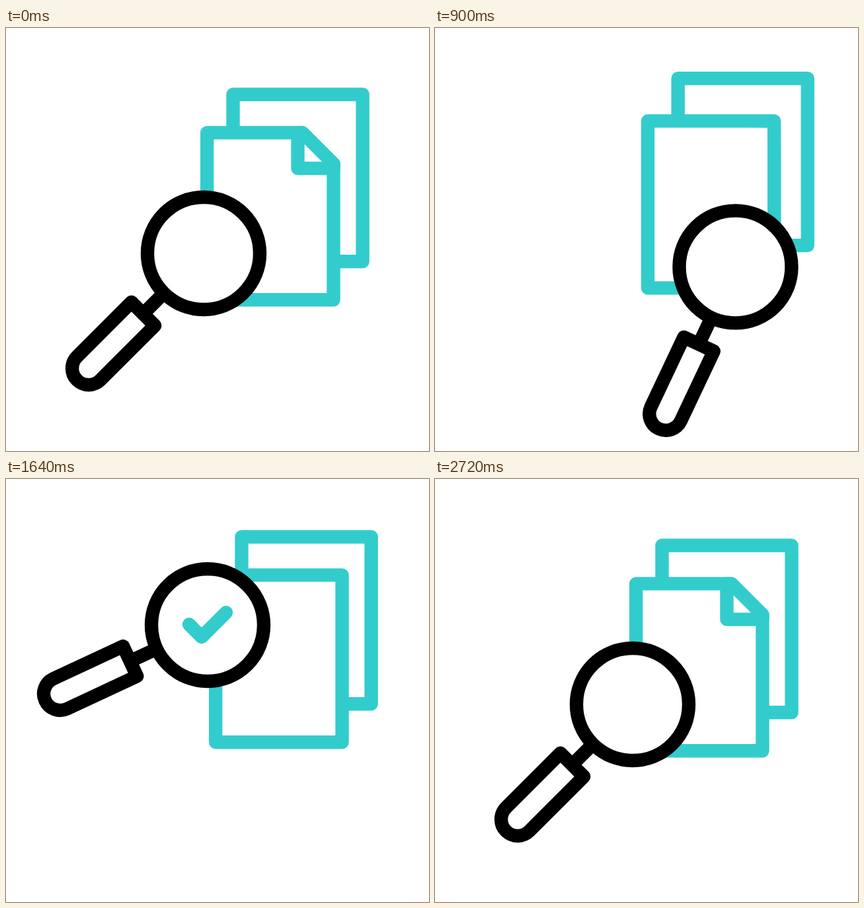
Recreate the animation shown at these times as an HTML page. Size 640 px wide and 640 px high, loop 3 s.

```html
<!DOCTYPE html>
<html lang="en">
<head>
<meta charset="utf-8">
<title>Document search</title>
<style>
html, body { margin: 0; width: 100%; height: 100%; overflow: hidden; background: #fff; }
svg { display: block; width: 100vw; height: 100vh; }
.line { stroke-width: 20.4; stroke-linecap: round; stroke-linejoin: round; }
.teal { stroke: #33cccc; }
.ink { stroke: #000; }
.paper { fill: #fff; }
.bare { fill: none; }
</style>
</head>
<body>
<svg viewBox="0 0 640 640">
  <defs><clipPath id="lens"><circle r="82"/></clipPath></defs>
  <path id="back" class="line teal paper" d="M343.5 100.5H539.6V353.2H343.5Z"/>
  <g id="front">
    <path id="sheet" class="line teal paper"/>
    <path id="flap" class="line teal paper"/>
  </g>
  <g id="glass">
    <g id="handle">
      <path class="line ink" d="M0 85V129"/>
      <path class="line ink paper" d="M-25 129.4H25V246A25 25 0 0 1 -25 246Z"/>
    </g>
    <circle r="85" class="paper"/>
    <g clip-path="url(#lens)">
      <path id="glint" class="line teal bare" d="M-120 0H120"/>
    </g>
    <path id="check" class="line teal bare" d="M-28 -1L-9 18L28 -19"/>
    <circle r="85" class="line ink bare"/>
  </g>
</svg>
<script>
const LOOP = 3000, STEP = 20, END = 2720;
const CHECK_LEN = Math.hypot(19, 19) + Math.hypot(37, 37);
const el = id => document.getElementById(id);
const mix = (a, b, k) => a + (b - a) * k;
const set = (id, name, value) => el(id).setAttribute(name, value);
const show = (id, on) => set(id, 'visibility', on ? 'visible' : 'hidden');

function ease(t, from, to) {
  const k = Math.min(1, Math.max(0, (t - from) / (to - from)));
  return k * k * (3 - 2 * k);
}

// Slope of channel c at key i: flat at the ends, limited to avoid overshoot.
function slope(keys, i, c) {
  if (i === 0 || i === keys.length - 1) return 0;
  const [p, q, r] = [keys[i - 1], keys[i], keys[i + 1]];
  const before = (q[c] - p[c]) / (q[0] - p[0]);
  const after = (r[c] - q[c]) / (r[0] - q[0]);
  if (before * after <= 0) return 0;
  const mean = (r[c] - p[c]) / (r[0] - p[0]);
  const cap = 3 * Math.min(Math.abs(before), Math.abs(after));
  return Math.sign(mean) * Math.min(Math.abs(mean), cap);
}

function spline(keys, t) {
  if (t >= keys[keys.length - 1][0]) return keys[keys.length - 1].slice(1);
  if (t <= keys[0][0]) return keys[0].slice(1);
  const i = keys.findIndex(k => k[0] > t) - 1;
  const a = keys[i], b = keys[i + 1], d = b[0] - a[0], u = (t - a[0]) / d;
  return [1, 2, 3].map(c =>
    mix(a[c], b[c], u * u * (3 - 2 * u)) +
    d * u * (1 - u) * ((1 - u) * slope(keys, i, c) - u * slope(keys, i + 1, c)));
}

// Lens centre x, y and handle angle.
const REST = [299, 341, 45], RIGHT = [455.5, 362.5, 25], TOP = [293.5, 205.5, 65.3];
const RUNS = [
  [[200, ...REST], [860, ...RIGHT]],
  [[860, ...RIGHT], [1120, 427, 332, 33.2], [1280, 391, 296, 42.5],
   [1640, 305, 221, 65], [1840, ...TOP]],
  [[1981, ...TOP], [2749, ...REST]]
];
const glassAt = t => spline(RUNS[t < 860 ? 0 : t < 1900 ? 1 : 2], t);

// Diagonal slide of a sheet: out past its place, settle, back past home, settle.
function slide(t, out, home) {
  return 26 * ease(t, out, out + 500) - 13 * ease(t, out + 500, out + 840)
       - 26 * ease(t, home, home + 500) + 13 * ease(t, home + 500, home + 840);
}

function drawFront(t) {
  const bend = ease(t, 560, 920) - ease(t, 1880, 2220);
  const shut = ease(t, 200, 560) - ease(t, 2210, 2520);
  const cx = mix(472, 495.5, bend), cy = mix(181.9, 158.4, bend);
  set('sheet', 'd', `M304.2 158.4H448.5L${cx} ${cy}L495.5 205.4V411.2H304.2Z`);
  const x = mix(441.5, 448.5, shut), y = mix(212.4, 205.4, shut);
  const fx = mix(441.5, 472, shut), fy = mix(212.4, 181.9, shut);
  set('flap', 'd', `M448.5 158.4L${x} 158.4L${fx} ${fy}L495.5 ${y}L495.5 205.4Z`);
  show('flap', shut < 1);
}

function drawCheck(t) {
  const from = CHECK_LEN * ease(t, 2000, 2400);
  const to = CHECK_LEN * ease(t, 1220, 1620);
  show('check', to > from);
  set('check', 'stroke-dasharray', `${Math.max(0.01, to - from)} 200`);
  set('check', 'stroke-dashoffset', -from);
}

function draw(t) {
  if (t >= END) t = 0;
  const b = slide(t, 320, 1860), f = slide(t, 200, 1714);
  set('back', 'transform', `translate(${b} ${-b})`);
  set('front', 'transform', `translate(${f} ${-f})`);
  drawFront(t);

  const [x, y, angle] = glassAt(t);
  set('glass', 'transform', `translate(${x} ${y})`);
  set('handle', 'transform', `rotate(${angle})`);
  const sweep = mix(-96, 96, ease(t, 470, 900));
  set('glint', 'transform', `rotate(-29) translate(0 ${sweep})`);
  show('glint', t > 470 && t < 900);
  drawCheck(t);
}

const start = performance.now();
function tick() {
  const t = (performance.now() - start) % LOOP;
  draw(Math.floor(t / STEP) * STEP);
  requestAnimationFrame(tick);
}
tick();
</script>
</body>
</html>
```
